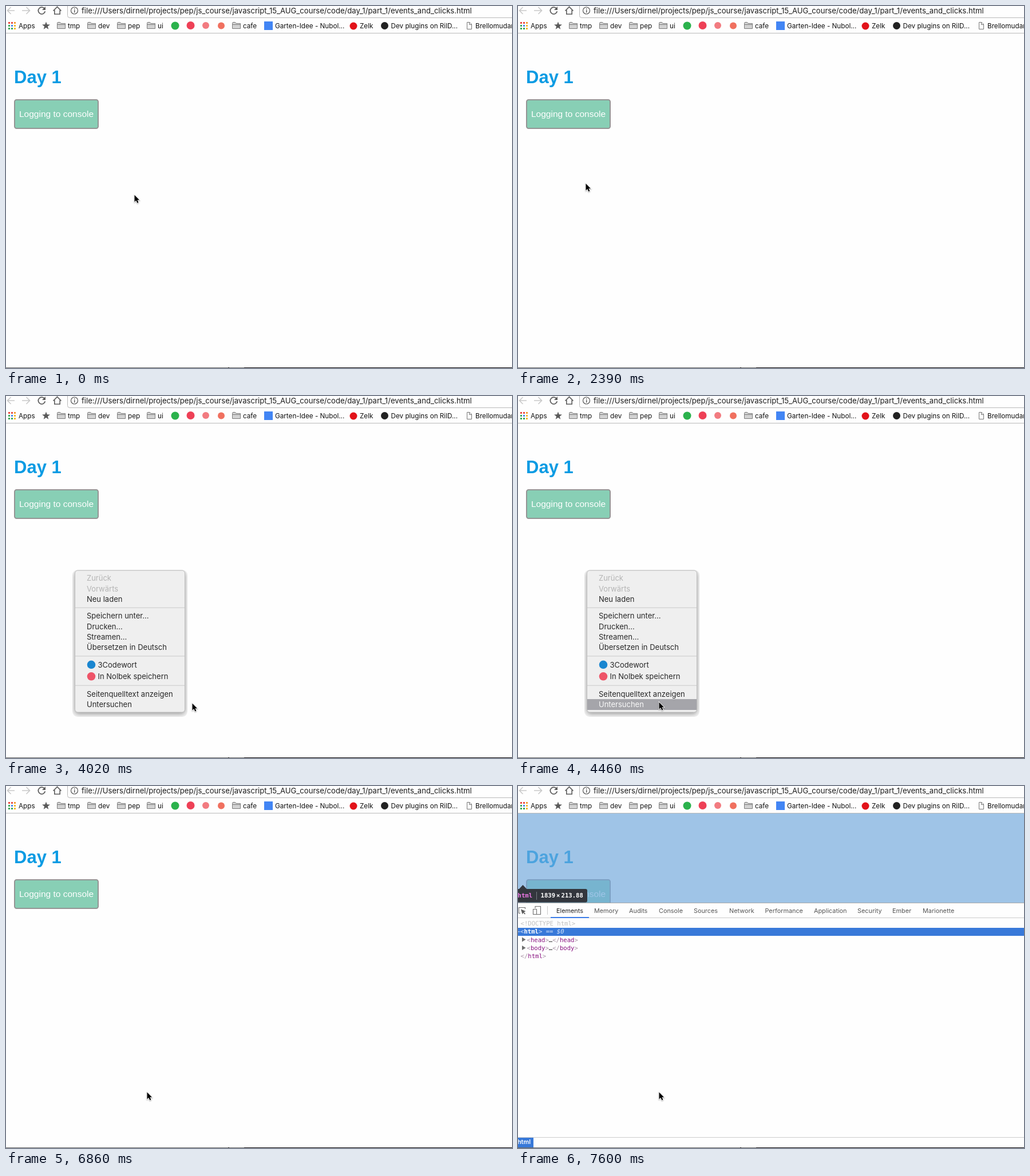
Write an HTML page with a canvas that moves like this. It is 884x633 px and loops after 8000 ms.

```html
<!DOCTYPE html>
<html lang="de">
<head>
<meta charset="utf-8">
<title>Events and clicks</title>
<style>
html, body { margin: 0; width: 100%; height: 100%; overflow: hidden; background: #fefefe; }
canvas { display: block; }
</style>
</head>
<body>
<canvas id="stage" width="884" height="633"></canvas>
<script>
const W = 884, H = 633, LOOP = 8000;
const ctx = document.getElementById('stage').getContext('2d');
const UI = 'Inter, "Noto Sans", sans-serif';
const PAGE = '"Liberation Sans", Arial, sans-serif';
const MONO = '"DejaVu Sans Mono", monospace';
const BLUE = '#3879d9';

// Pointer stops: time, x, y. Each one holds until the next.
const POINTER = [
  [0, 224, 330],
  [1500, 238, 312], [1650, 262, 284], [1800, 278, 270], [1940, 255, 274],
  [2090, 200, 288], [2240, 146, 303], [2390, 118, 310],
  [2980, 160, 316], [3130, 270, 336], [3270, 361, 358], [3420, 396, 392],
  [3570, 400, 440], [3720, 384, 490], [3870, 355, 524], [4020, 325, 537],
  [4170, 290, 544], [4310, 262, 541], [4460, 246, 535]
];

const MENU = [
  ['Zurück', 323], ['Vorwärts', 341.5], ['Neu laden', 359.5],
  ['Speichern unter...', 389], ['Drucken...', 407.5], ['Streamen...', 425.5],
  ['Übersetzen in Deutsch', 444],
  ['3Codewort', 474.5, '#1a86d0'], ['In Nolbek speichern', 495, '#ee5468'],
  ['Seitenquelltext anzeigen', 525.5], ['Untersuchen', 543.5]
];

const TABS = [
  ['Elements', 67], ['Memory', 133], ['Audits', 194], ['Console', 246],
  ['Sources', 307], ['Network', 369], ['Performance', 431.5],
  ['Application', 517], ['Security', 593], ['Ember', 654], ['Marionette', 707]
];

function rect(x, y, w, h, color) {
  ctx.fillStyle = color;
  ctx.fillRect(x, y, w, h);
}

function round(x, y, w, h, r) {
  ctx.beginPath();
  ctx.roundRect(x, y, w, h, r);
}

function disc(x, y, r, color) {
  ctx.beginPath();
  ctx.arc(x, y, r, 0, Math.PI * 2);
  ctx.fillStyle = color;
  ctx.fill();
}

function text(str, x, y, color, font) {
  ctx.font = font;
  ctx.fillStyle = color;
  ctx.fillText(str, x, y);
}

function trace(d, color, width) {
  ctx.strokeStyle = color;
  ctx.lineWidth = width;
  ctx.stroke(new Path2D(d));
}

function fillPath(d, color) {
  ctx.fillStyle = color;
  ctx.fill(new Path2D(d));
}

// Runs of [string, color, style] set one after another.
function code(x, y, runs) {
  for (const [str, color, style = ''] of runs) {
    text(str, x, y, color, `${style} 10.6px ${MONO}`);
    x += ctx.measureText(str).width;
  }
}

function folder(label, x) {
  const d = `M${x + .5} 39.5V30.5Q${x + .5} 28.5 ${x + 2} 28.5H${x + 5.5}L${x + 7} 30.5H${x + 14.5}V39.5Z`;
  fillPath(d, '#d2d2d2');
  trace(d + `M${x + 1} 32.5H${x + 14}`, '#7c7c7c', 1);
  bookmark(label, x + 19);
}

function bookmark(label, x) {
  text(label, x, 38.5, '#111', `11.7px ${UI}`);
}

function star(cx, cy, r) {
  ctx.beginPath();
  for (let i = 0; i < 10; i++) {
    const a = i * Math.PI / 5 - Math.PI / 2, q = i % 2 ? r * .42 : r;
    ctx.lineTo(cx + q * Math.cos(a), cy + q * Math.sin(a));
  }
  ctx.fillStyle = '#5a5a5a';
  ctx.fill();
}

function toolbar() {
  rect(0, 0, W, 47, '#fefefe');
  trace('M15 8H3M8.5 2L2.5 8L8.5 14', '#c9c9c9', 1.6);
  trace('M28 8H41M35.5 2L41.5 8L35.5 14', '#c9c9c9', 1.6);
  trace('M67.3 4.6A6 6 0 1 0 68.3 9.3', '#5c5c5c', 1.8);
  fillPath('M69 1V7H63Z', '#5c5c5c');
  trace('M82.5 8.5L89.5 1.5L96.5 8.5M84.8 7V14.2H94.2V7', '#5c5c5c', 1.6);
  trace('M107.5 0V16.5Q107.5 20.5 111 20.5H884', '#b9b9b9', 1);
  ctx.beginPath();
  ctx.arc(119.5, 8, 6, 0, Math.PI * 2);
  ctx.strokeStyle = '#555';
  ctx.lineWidth = 1.2;
  ctx.stroke();
  rect(119, 7, 1.4, 4.5, '#555');
  rect(119, 4.3, 1.4, 1.6, '#555');
  text('file:///Users/dirnel/projects/pep/js_course/javascript_15_AUG_course/code/day_1/part_1/events_and_clicks.html',
    132, 12.5, '#1c1c1c', `13.1px ${UI}`);

  const dots = ['#e8453c', '#e8453c', '#f29a2e', '#3aa757', '#4285f4', '#f5b92e', '#3aa757', '#3aa757', '#f5b92e'];
  dots.forEach((c, i) => rect(4 + i % 3 * 5, 28 + Math.floor(i / 3) * 5, 3, 3, c));
  bookmark('Apps', 22);
  star(70, 34.8, 7.3);
  folder('tmp', 89);
  folder('dev', 142);
  folder('pep', 194);
  folder('ui', 246);
  disc(295.5, 34.5, 7, '#2bb24c');
  disc(322.5, 34, 7, '#ee4056');
  disc(349, 34, 6, '#f27b80');
  disc(376, 34.5, 6, '#f0705f');
  folder('cafe', 395);
  rect(451, 27, 15, 15, '#4285f4');
  bookmark('Garten-Idee - Nubol...', 470);
  disc(607, 35, 6.5, '#e2131a');
  bookmark('Zelk', 618);
  disc(661.5, 34.5, 6.5, '#222');
  bookmark('Dev plugins on RilD...', 672.5);
  trace('M805.5 28.5H810L813.5 32V40.5H805.5ZM809.5 28.5V32.5H813.5', '#777', 1);
  bookmark('Brellomudan', 820);
  rect(0, 47, W, 1, '#b8b8b8');
}

function page() {
  rect(0, 48, W, H - 48, '#fefefe');
  text('Day 1', 14, 134.5, '#0a9be3', `bold 31px ${PAGE}`);
  round(15, 164, 146, 50, 3.5);
  ctx.fillStyle = '#88cfb5';
  ctx.fill();
  ctx.strokeStyle = '#949494';
  ctx.lineWidth = 2;
  ctx.stroke();
  text('Logging to console', 23, 194, '#fff', `15.5px ${PAGE}`);
}

function menu(alpha, selected) {
  ctx.save();
  ctx.globalAlpha = alpha;
  round(116, 304, 201, 257, 9);
  ctx.fillStyle = '#f5f5f5';
  ctx.fill();
  ctx.clip();
  ctx.shadowColor = 'rgba(0,0,0,.38)';
  ctx.shadowBlur = 9;
  ctx.shadowOffsetY = 3;
  round(120.5, 305, 192, 248, 5);
  ctx.fillStyle = '#efefef';
  ctx.fill();
  ctx.shadowColor = 'transparent';
  ctx.strokeStyle = '#bcbcbc';
  ctx.lineWidth = 1;
  ctx.stroke();
  for (const y of [369.5, 454, 505.5]) rect(121, y, 191, 1.5, '#d6d6d6');
  if (selected) rect(121, 530, 191, 19, '#a5a5aa');
  MENU.forEach(([label, y, icon], i) => {
    const active = selected && i === MENU.length - 1;
    const color = active ? '#fafafa' : i < 2 ? '#b4b4b4' : '#272727';
    if (icon) disc(149, y - 4.7, 7.3, icon);
    text(label, icon ? 160.5 : 141, y, color, `13px ${UI}`);
  });
  ctx.restore();
}

function highlight() {
  rect(0, 48, W, 156, 'rgba(111,168,220,.66)');
  fillPath('M1 181L8.5 173L16 181Z', '#33363d');
  round(-6, 180, 127, 23.5, 3);
  ctx.fillStyle = '#33363d';
  ctx.fill();
  rect(32, 185, 1, 14, '#777b82');
  const bold = `bold 10.6px ${MONO}`;
  text('html', -.5, 195, '#ee78e6', bold);
  text('1839', 39.5, 195, '#fff', bold);
  text('×', 67, 195, '#fff', bold);
  text('213.88', 75.5, 195, '#fff', bold);
}

function tree() {
  const tag = '#881280', edge = '#a894a6', pale = '#d5e2f8';
  code(4.5, 244, [['<!DOCTYPE html>', '#c0c0c0']]);
  rect(0, 248, W, 14, BLUE);
  for (const x of [0, 2]) rect(x, 254, 1.2, 1.5, pale);
  code(4, 258, [['<', pale], ['html', '#fff', 'bold'], ['>', pale],
    [' == ', pale], ['$0', pale, 'italic']]);
  ['head', 'body'].forEach((name, i) => {
    const y = 272.5 + i * 14.5;
    fillPath(`M7 ${y - 8}L13.5 ${y - 4}L7 ${y}Z`, '#6e6e6e');
    code(15.5, y, [['<', edge], [name, tag], ['>', edge], ['…', '#222'],
      ['</', edge], [name, tag], ['>', edge]]);
  });
  code(4.5, 301, [['</', edge], ['html', tag], ['>', edge]]);
  rect(0, 615, 27, 17, BLUE);
  text('html', -1, 626, '#fff', `600 10.8px ${UI}`);
}

// stage 1: empty pane, 2: first tabs, 3: loaded
function devtools(stage) {
  if (stage === 3) highlight();
  rect(0, 204, W, H - 204, '#fefefe');
  rect(0, 204, W, 1, '#a8a8a8');
  if (stage === 1) return;
  trace('M4 222.5H1.5V212.5H12.5V215', '#6e6e6e', 1.1);
  fillPath('M5 215.5L13.5 219L10.3 220.4L13 223.4L11.8 224.4L9.2 221.5L7.7 224.4Z', '#5a5a5a');
  trace('M30 214V210.5H39.5V224.5H33M26.5 215.5H32.5V224.5H26.5Z', '#6e6e6e', 1.1);
  rect(51, 210, 1, 15, '#ccc');
  rect(0, 230, W, 1, '#ccc');
  rect(57, 229, 67, 2, '#3b7de8');
  TABS.slice(0, stage === 3 ? 11 : 9).forEach(([label, x], i) =>
    text(label, x, 221.5, i ? '#555' : '#222', `10.85px ${UI}`));
  rect(0, 614, W, 1, '#ccc');
  if (stage === 3) tree();
}

function bottomEdge() {
  rect(0, 632, W, 1, '#686868');
  rect(388, 632, 2, 1, '#000');
  rect(416, 632, W - 416, 1, '#0c080c');
}

function pointer(t) {
  const [, x, y] = POINTER.findLast(p => p[0] <= t);
  ctx.save();
  ctx.translate(x + .5, y + .5);
  const arrow = new Path2D('M0 0V12L2.8 9.5L4.9 14L6.9 13.1L4.9 8.8H8.6Z');
  ctx.shadowColor = 'rgba(0,0,0,.35)';
  ctx.shadowBlur = 2;
  ctx.shadowOffsetY = 1;
  ctx.strokeStyle = '#fff';
  ctx.lineWidth = 1.6;
  ctx.stroke(arrow);
  ctx.shadowColor = 'transparent';
  ctx.fillStyle = '#000';
  ctx.fill(arrow);
  ctx.restore();
}

function draw(t) {
  page();
  toolbar();
  if (t >= 2680 && t < 6860) {
    menu(t < 6560 ? 1 : t < 6710 ? .93 : .45, t >= 4170);
  }
  if (t >= 7300) devtools(t < 7450 ? 1 : t < 7600 ? 2 : 3);
  bottomEdge();
  pointer(t);
}

const start = performance.now();
function tick() {
  draw((performance.now() - start) % LOOP);
  requestAnimationFrame(tick);
}
tick();
</script>
</body>
</html>
```
